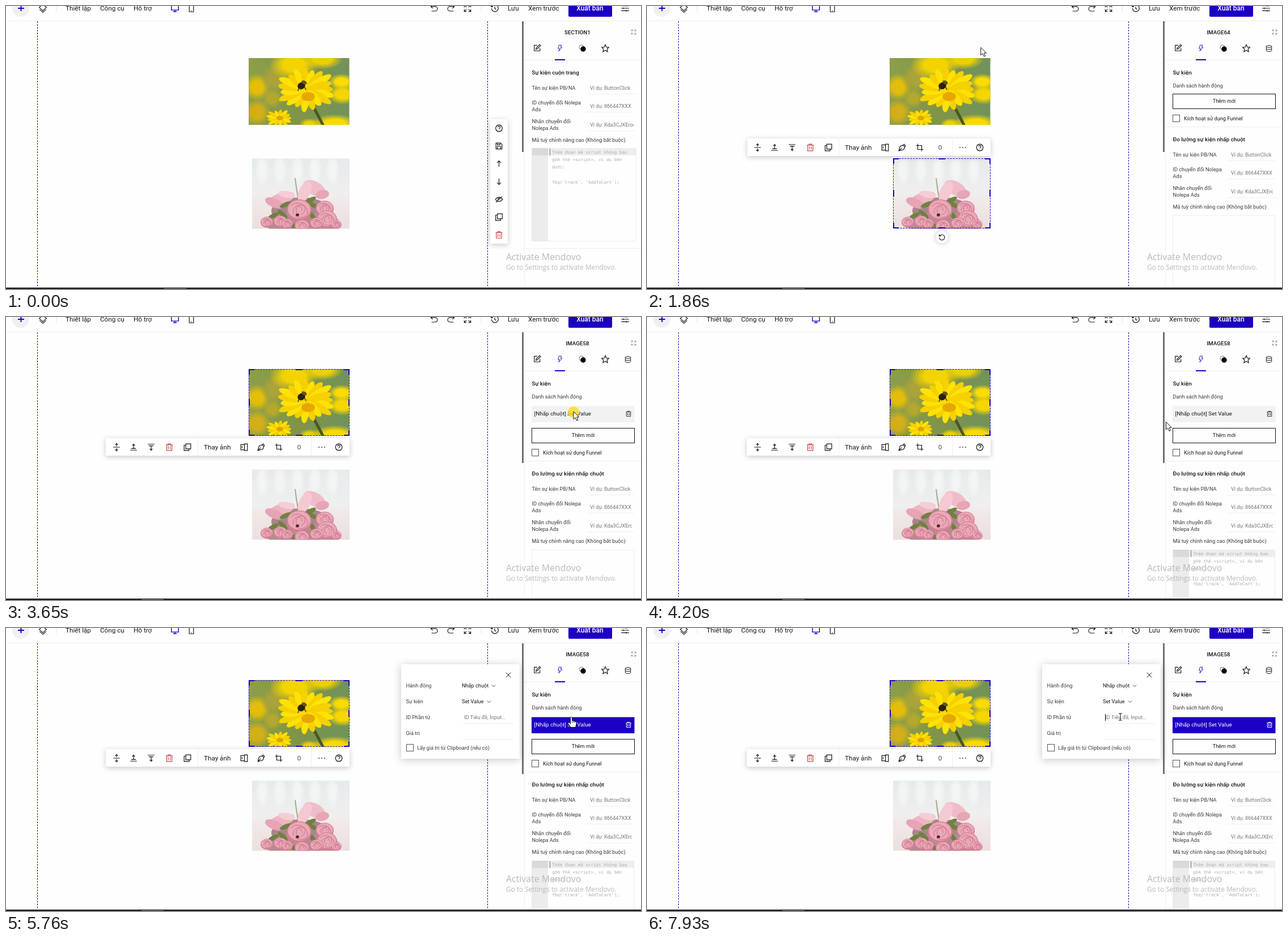
An HTML page with a canvas for the animation above (8 s loop, 1120x500 px).

```html
<!DOCTYPE html>
<html lang="vi">
<head>
<meta charset="utf-8">
<style>
html, body { margin: 0; width: 1120px; height: 500px; overflow: hidden; background: #fefefe; }
canvas { display: block; }
</style>
</head>
<body>
<canvas id="stage" width="1120" height="500"></canvas>
<script>
const ctx = document.getElementById('stage').getContext('2d');
const BLUE = '#1c00c2', INK = '#17171b', GREY = '#757575', RED = '#c9474c', LOOP = 8000;

const ICONS = {
  layers: 'M12 2L21 10L12 18L3 10Z M4 15L12 22L20 15',
  desktop: 'M2 3H22V17H2Z M12 17V21 M7 21.5H17',
  mobile: 'M6 1H18V22H6Z M11 19H13',
  undo: 'M8 2L3 7L8 12 M3 7H15A6 6 0 0 1 15 20H5',
  redo: 'M16 2L21 7L16 12 M21 7H9A6 6 0 0 0 9 20H19',
  expand: 'M3 9V3H9L3 3L9 9 M15 3H21V9V3L15 9 M21 15V21H15H21L15 15 M9 21H3V15V21L9 15',
  history: 'M3 12A9.5 9.5 0 1 0 6 5L3 8 M2 3V8H7 M12 7V13L16 15',
  sliders: 'M1 5H23 M1 12H23 M1 19H23 M15 3V7 M7 10V14 M15 17V21',
  edit: 'M12 4H3V21H20V13 M8 16L9 12L19 2L22 5L12 15Z',
  bolt: 'M9 2H17L14 9H19L8 22L11 13H6Z',
  star: 'M12 2L15 9L22 9.5L17 14.5L18.5 22L12 18L5.5 22L7 14.5L2 9.5L9 9Z',
  data: 'M3 5A9 3.5 0 0 1 21 5A9 3.5 0 0 1 3 5V19A9 3.5 0 0 0 21 19V5 M3 12A9 3.5 0 0 0 21 12',
  help: 'M12 2A10 10 0 1 0 12.01 2 M8.5 9A3.5 3.5 0 1 1 13 12.5Q12 13 12 14.5 M12 17V18.5',
  save: 'M3 3H17L21 7V21H3Z M7 3V8H15V3 M7 21V13H17V21',
  up: 'M12 21V3 M6 9L12 3L18 9',
  down: 'M12 3V21 M6 15L12 21L18 15',
  hidden: 'M1 12Q12-1 23 12Q12 25 1 12 M9 13A3.5 3.5 0 0 1 14 9 M3 21L21 3',
  copy: 'M7 2H22V17H7Z M7 6H2V22H17V17',
  trash: 'M2 5H22 M8 5V2H16V5 M4 5V22H20V5 M9 9V18 M15 9V18',
  spread: 'M2 12H22 M12 9V1L8 5 M12 1L16 5 M12 15V23L8 19 M12 23L16 19',
  above: 'M2 21H22 M5 16H19 M12 16V3L8 7 M12 3L16 7',
  below: 'M2 3H22 M5 8H19 M12 8V21L8 17 M12 21L16 17',
  flip: 'M12 4H2V20H12 M13 2H22V22H13Z M6 9V15',
  pen: 'M2 22L6 8L15 5L20 10L17 18Z M2 22L11 13 M15 5L18 2L22 7L20 10',
  crop: 'M6 1V18H23 M1 6H18V23',
  dots: 'M3 12H5 M11 12H13 M19 12H21',
  rotate: 'M4 8A9.5 9.5 0 1 1 3 14 M3 2V8H9',
  close: 'M4 4L20 20 M20 4L4 20',
  chevron: 'M3 8L12 17L21 8'
};

function text(s, x, y, size = 9.2, color = '#3a3a40', weight = 400, align = 'left', family = 'Roboto, sans-serif') {
  ctx.font = `${weight} ${size}px ${family}`;
  ctx.fillStyle = color;
  ctx.textAlign = align;
  ctx.fillText(s, x, y + size * .36);
}
function rect(x, y, w, h, color) {
  ctx.fillStyle = color;
  ctx.fillRect(x, y, w, h);
}
function frame(x, y, w, h, color) {
  ctx.strokeStyle = color;
  ctx.lineWidth = 1;
  ctx.strokeRect(x + .5, y + .5, w - 1, h - 1);
}
function card(x, y, w, h, blur = 9) {
  ctx.save();
  ctx.shadowColor = 'rgba(0,0,0,.22)';
  ctx.shadowBlur = blur;
  ctx.shadowOffsetY = 2;
  rect(x, y, w, h, '#fff');
  ctx.restore();
}
function icon(name, x, y, size = 14, color = INK, width = 1.2) {
  const k = size / 24;
  ctx.save();
  ctx.translate(x - size / 2, y - size / 2);
  ctx.scale(k, k);
  ctx.strokeStyle = color;
  ctx.lineWidth = width / k;
  ctx.stroke(new Path2D(ICONS[name]));
  ctx.restore();
}
function oval(x, y, rx, ry, color, angle = 0) {
  ctx.fillStyle = color;
  ctx.beginPath();
  ctx.ellipse(x, y, rx, ry, angle, 0, 7);
  ctx.fill();
}
function glow(x, y, r, color, squash = 1) {
  ctx.save();
  ctx.translate(x, y);
  ctx.scale(1, squash);
  const g = ctx.createRadialGradient(0, 0, r * .45, 0, 0, r);
  g.addColorStop(0, color);
  g.addColorStop(1, color + '00');
  oval(0, 0, r, r, g);
  ctx.restore();
}
function line(color, width, ...points) {
  ctx.strokeStyle = color;
  ctx.lineWidth = width;
  ctx.beginPath();
  for (let i = 0; i < points.length; i += 2) ctx.lineTo(points[i], points[i + 1]);
  ctx.stroke();
}
function clipped(x, y, w, h, draw) {
  ctx.save();
  ctx.beginPath();
  ctx.rect(x, y, w, h);
  ctx.clip();
  draw();
  ctx.restore();
}

function daisy(x, y, r, squash, petals) {
  oval(x, y, r * .5, r * .5 * squash, '#f2cb00');
  for (let i = 0; i < petals; i++) {
    const a = i * 6.283 / petals, reach = r * (.52 + .05 * (i % 3));
    const dx = Math.cos(a) * reach, dy = Math.sin(a) * reach * squash;
    oval(x + dx, y + dy, Math.hypot(dx, dy) * .85, r * .14, i % 2 ? '#ffe205' : '#f6d000', Math.atan2(dy, dx));
  }
}
function flowerPhoto() {
  clipped(428, 92, 177.5, 118, () => {
    const g = ctx.createLinearGradient(428, 0, 605, 0);
    g.addColorStop(0, '#8c9f4a');
    g.addColorStop(.5, '#7f9448');
    g.addColorStop(1, '#71925c');
    rect(428, 92, 178, 118, g);
    glow(443, 143, 24, '#e3bd0a');
    glow(474, 128, 26, '#a9a33a');
    glow(508, 104, 44, '#f4d303', .6);
    glow(558, 94, 36, '#ecd005', .5);
    glow(443, 188, 24, '#d2ae18');
    glow(470, 163, 18, '#b3a82d');
    glow(592, 134, 24, '#fbdb02', .6);
    glow(594, 156, 28, '#f5d602', .65);
    glow(580, 208, 42, '#f8da03', .4);
    glow(535, 209, 18, '#ead007', .6);
    line('#4c5720', 5, 536, 168, 547, 187, 560, 212);
    daisy(530, 147, 48, .74, 19);
    oval(533, 160, 12, 8, '#e5a800');
    daisy(482, 198, 22, .65, 13);
    oval(483, 198, 6, 4, '#dca406');
    oval(521, 141, 7, 6, '#282310', -.5);
    oval(526, 135, 5, 3, '#665418', .5);
    line('#282310', 1.2, 517, 143, 515, 150);
    line('#282310', 1.2, 526, 142, 529, 148);
  });
}
function rose(x, y, r) {
  oval(x, y, r, r * .88, '#d27f94');
  oval(x, y - r * .08, r * .9, r * .74, '#eaa9b8');
  for (let k = .72; k > .2; k -= .2) {
    ctx.strokeStyle = '#cb6f87';
    ctx.lineWidth = 1;
    ctx.beginPath();
    ctx.ellipse(x, y, r * k, r * k * .75, k * 5, 0, 4.8);
    ctx.stroke();
  }
}
function rosePhoto() {
  clipped(434, 269.5, 172, 124, () => {
    const g = ctx.createLinearGradient(0, 269, 0, 393);
    g.addColorStop(0, '#e6eaec');
    g.addColorStop(.5, '#efefef');
    g.addColorStop(.62, '#f1e8e8');
    g.addColorStop(1, '#ebdfdf');
    rect(434, 269, 172, 125, g);
    for (let x = 452; x < 600; x += 31) glow(x, 290, 12, '#f3f5f5', 2.5);
    line('#a3a98c', 2, 510, 304, 512, 320, 516, 345);
    oval(520, 362, 52, 24, '#a9858a');
    oval(523, 384, 66, 20, '#b78b90');
    oval(544, 322, 21, 12, '#f0bcc8', .5);
    oval(527, 328, 10, 20, '#f4c9d2', .45);
    oval(558, 333, 12, 8, '#e7a5b5', -.2);
    oval(486, 340, 24, 10, '#eeb5c2', -.3);
    oval(473, 348, 17, 8, '#e6a4b5', .4);
    oval(495, 333, 15, 6, '#f5cdd5', .2);
    for (const [x, y, a] of [[537, 343, -.5], [540, 351, .5], [493, 351, -.4], [488, 368, .7], [541, 372, 1], [471, 371, -.5], [505, 388, .3]])
      oval(x, y, 11, 4, '#6f8140', a);
    for (const [x, y, r] of [[562, 358, 16], [517, 361, 22], [566, 377, 18], [484, 381, 12], [460, 382, 11], [548, 384, 12], [496, 385, 10], [522, 389, 13], [583, 386, 9]])
      rose(x, y, r);
    oval(514, 369, 3, 2.5, '#4c262d');
  });
}

function outline(x, y, w, h, handles) {
  ctx.setLineDash([3, 2]);
  frame(x, y, w, h, BLUE);
  ctx.setLineDash([]);
  if (!handles) return;
  const r = x + w, b = y + h, mx = x + w / 2, my = y + h / 2;
  for (const [cx, cy, sx, sy] of [[x + 1, y + 1, 1, 1], [r - 1, y + 1, -1, 1], [x + 1, b - 1, 1, -1], [r - 1, b - 1, -1, -1]])
    line(BLUE, 2, cx + 9 * sx, cy, cx, cy, cx, cy + 9 * sy);
  for (const yy of [y + 1, b - 1]) line(BLUE, 2, mx - 6, yy, mx + 6, yy);
  for (const xx of [x + 1, r - 1]) line(BLUE, 2, xx, my - 6, xx, my + 6);
}
function elementBar(x, y) {
  card(x, y, 606 - x, 31);
  const m = y + 16;
  [['spread', 195], ['above', 225], ['below', 256], ['trash', 288], ['copy', 320], ['flip', 420], ['pen', 450], ['crop', 481], ['help', 587]]
    .forEach(([name, ix]) => icon(name, ix, m, 14, name == 'trash' ? RED : INK));
  icon('dots', 557, m, 15, INK, 2);
  text('Thay ảnh', 349, m, 11.7, INK);
  text('0', 517, m, 11.5, '#444', 400, 'center');
  rect(338, y, 1, 31, '#eee');
  rect(538, y, 1, 31, '#eee');
}
function sectionBar() {
  card(854, 200, 31, 220);
  ['help', 'save', 'up', 'down', 'hidden', 'copy', 'trash']
    .forEach((name, i) => icon(name, 869.5, 216 + i * 31.4, 14, name == 'trash' ? RED : INK));
}

function header() {
  rect(0, 26, 1120, 1, '#eeeef0');
  oval(26, 4, 15, 15, '#f0f0f4');
  line(BLUE, 2, 21, 4, 32, 4);
  line(BLUE, 2, 26.5, -1, 26.5, 9);
  icon('layers', 65, 4, 17);
  rect(88, 0, 1, 10, '#e4e4e6');
  rect(838, 0, 1, 10, '#e4e4e6');
  [['Thiết lập', 105], ['Công cụ', 166], ['Hỗ trợ', 225], ['Lưu', 885], ['Xem trước', 921]]
    .forEach(([s, x]) => text(s, x, 4, 11.7, INK));
  icon('desktop', 298, 4, 15, BLUE, 1.4);
  [['mobile', 327], ['undo', 755], ['redo', 785], ['expand', 814], ['history', 862], ['sliders', 1092]]
    .forEach(([name, x]) => icon(name, x, 4, 15));
  ctx.fillStyle = BLUE;
  ctx.beginPath();
  ctx.roundRect(992, -10, 77, 29, 2);
  ctx.fill();
  text('Xuất bản', 1030, 4, 12, '#fff', 500, 'center');
}
function editor(y, right, bottom, loaded) {
  clipped(927, y, right - 926, bottom - y, () => {
    frame(927, y, right - 927, 165, '#ececec');
    if (!loaded) return;
    rect(928, y, 28, 164, '#ebecec');
    rect(928, y, 28, 13, '#dadada');
    rect(956, y, right - 957, 13, '#eeeeee');
    rect(959, y + 1, 1, 12, '#777');
    ['Thêm đoạn mã script không bao', 'gồm thẻ <script>, ví dụ bên', 'dưới:', '', "fbq('track', 'AddToCart');"]
      .forEach((s, i) => text(s, 963, y + 7 + i * 13.2, 7.6, '#adadad', 400, 'left', '"DejaVu Sans Mono", monospace'));
  });
}
function trackingFields(y, right) {
  text('Tên sự kiện PB/NA', 927.5, y);
  text('ID chuyển đổi Nolepa', 927.5, y + 26);
  text('Ads', 927.5, y + 37.5);
  text('Nhãn chuyển đổi', 927.5, y + 59);
  text('Nolepa Ads', 927.5, y + 70.5);
  text('Mã tuỳ chỉnh nâng cao (Không bắt buộc)', 927.5, y + 92);
  [['ButtonClick', 0], ['866447XXX', 31.5], ['Kda3CJXEroeW', 64.5]].forEach(([s, dy]) => {
    clipped(1024, y + dy - 10, right - 1028, 20, () => text('Ví dụ: ' + s, 1030, y + dy, 9.1, GREY));
    rect(1024, Math.round(y + dy + 10), right - 1024, 1, '#f0f0f1');
  });
}
function heading(s, y) { text(s, 927.5, y, 9.95, INK, 500); }
function checkbox(x, y) { frame(x, y, 13, 13, '#555'); }

function imageBody(hasItem, open, loaded) {
  const dy = hasItem ? 41 : 0;
  heading('Sự kiện', 117);
  text('Danh sách hành động', 927.5, 140.5, 9.15);
  if (hasItem) {
    rect(927, 157.5, 181.5, 28.5, open ? BLUE : '#f1f2f3');
    text('[Nhấp chuột] Set Value', 931.5, 170.5, 9.95, open ? '#fff' : INK);
    icon('trash', 1098, 171, 11, open ? '#fff' : '#333', 1);
  }
  frame(927, 155 + dy, 182, 27, '#111');
  text('Thêm mới', 1018, 168 + dy, 9, INK, 400, 'center');
  checkbox(927, 192 + dy);
  text('Kích hoạt sử dụng Funnel', 947, 198.5 + dy, 9.2, INK);
  rect(914, 213 + dy, 206, 1, '#eeeef0');
  heading('Đo lường sự kiện nhấp chuột', 235 + dy);
  trackingFields(263 + dy, 1108);
  editor(370 + dy, 1108, 496, loaded);
}
function panel(t, title) {
  const image = t >= 1720;
  rect(910, 27, 3, 231, '#707070');
  rect(914, 27, 1, 470, '#f0f0f0');
  text(title, 1008, 46, 9.84, INK, 500, 'center');
  icon('expand', 1107, 46, 10, '#999', 1);
  icon('edit', 937, 74);
  icon('bolt', 977, 74.5, 13, BLUE, .9);
  ctx.strokeStyle = '#777';
  ctx.lineWidth = 1;
  ctx.beginPath();
  ctx.arc(1015, 73, 4, 0, 7);
  ctx.stroke();
  oval(1018, 76, 4.7, 4.7, '#000');
  icon('star', 1057, 74.5, 15);
  if (image) icon('data', 1097, 75, 12.5, INK, 1);
  rect(914, 95, 206, 1, '#eeeef0');
  rect(968, 94, 18, 2, BLUE);
  if (image) {
    imageBody(t >= 3640, t >= 5360, t >= 2130 && t < 3640 || t >= 3850);
  } else {
    heading('Sự kiện cuộn trang', 117);
    trackingFields(145, 1111);
    editor(251, 1112, 417, true);
    rect(914, 428, 206, 1, '#eeeef0');
  }
}
function popup(t) {
  card(697, 64, 209, 167, 14);
  icon('close', 886, 83, 13, '#222', 1);
  ['Hành động', 'Sự kiện', 'ID Phần tử', 'Giá trị'].forEach((s, i) => text(s, 705.5, 102 + i * 28));
  text('Nhấp chuột', 804, 102, 9.2, INK);
  icon('chevron', 860, 102, 8, '#444', 1);
  text('Set Value', 804, 130, 9.2, INK);
  icon('chevron', 852, 130, 8, '#444', 1);
  text('ID Tiêu đề, Input...', 808, 158, 9.2, GREY);
  rect(804, 168, 92, 1, '#eee');
  rect(804, 196, 92, 1, '#eee');
  checkbox(706, 205);
  text('Lấy giá trị từ Clipboard (nếu có)', 725, 212);
  if (t >= 7600) rect(808, 152, 1, 12, '#111');
}

// time, x, y
const PATH = [
  [330, 972, 447], [470, 540, 345], [870, 540, 345], [1150, 800, 200], [1430, 1056, 67], [1580, 1056, 67],
  [1720, 830, 46], [1860, 589, 73], [2100, 525, 140], [2330, 516, 150], [2540, 516, 150], [2880, 1055, 67],
  [3000, 1105, 95], [3170, 1045, 140], [3240, 1045, 140], [3450, 1001, 167], [4060, 1001, 167], [4350, 825, 205],
  [4680, 1002, 174], [5560, 1002, 174], [5850, 995, 150], [6190, 979, 171], [6440, 979, 171], [6650, 883, 147],
  [6900, 803, 157], [7200, 835, 157], [8000, 835, 157]
];
const CLICKS = [[730, 870], [2400, 2500], [3590, 3710], [4700, 4880], [7530, 7800]];
const HANDS = [[1350, 1600], [2820, 2960], [3380, 3640], [3720, 4130], [4590, 6480]];
const ARROW = new Path2D('M0 0V13.5L3.2 10.7L5.7 16L8 15L5.6 9.8H9.7Z');
const HAND = new Path2D('M-1.5 1Q0-1 1.5 1V6L8 8Q9.5 9 9 12L7.5 18H-1L-6 11Q-6 8.5-3.5 10L-1.5 12Z');
const during = (spans, t) => spans.some(([a, b]) => t >= a && t < b);

function pointer(t) {
  if (t < 330) return;
  const i = PATH.findIndex(p => p[0] > t), [t0, x0, y0] = PATH[i - 1], [t1, x1, y1] = PATH[i];
  const k = (t - t0) / (t1 - t0), x = x0 + (x1 - x0) * k, y = y0 + (y1 - y0) * k;
  if (during(CLICKS, t)) oval(x, y + 1, 10, 10, 'rgba(250,222,20,.8)');
  ctx.save();
  ctx.translate(x, y);
  if (t >= 6780) {
    line('#111', 1, -3, -6, 3, -6);
    line('#111', 1, 0, -6, 0, 6);
    line('#111', 1, -3, 6, 3, 6);
  } else {
    const hand = during(HANDS, t), shape = hand ? HAND : ARROW;
    ctx.fillStyle = '#fff';
    ctx.strokeStyle = '#111';
    ctx.lineWidth = 1;
    ctx.fill(shape);
    ctx.stroke(shape);
    if (hand) for (const fx of [1.5, 4, 6.5]) line('#111', .8, fx, 6.5, fx, 10);
  }
  ctx.restore();
}

function draw(now) {
  const t = now % LOOP;
  const roseOn = t >= 870 && t < 2470, flowerOn = t >= 2470;
  rect(0, 0, 1120, 500, '#fefefe');
  header();
  ctx.setLineDash([3, 2]);
  line(BLUE, 1, 55.5, 27, 55.5, 497);
  line(BLUE, 1, 849.5, 27, 849.5, 497);
  ctx.setLineDash([]);
  flowerPhoto();
  rosePhoto();
  if (t >= 2070) outline(428, 92, 178, 118, flowerOn);
  if (t >= 450 && t < 2470) outline(434, 269, 172, 124, roseOn);
  if (roseOn) {
    elementBar(177, 234);
    ctx.save();
    ctx.shadowColor = 'rgba(0,0,0,.25)';
    ctx.shadowBlur = 7;
    oval(520, 408.5, 11, 11, '#fff');
    ctx.restore();
    icon('rotate', 520, 408.5, 12);
  } else if (flowerOn) {
    elementBar(176, 214);
  } else {
    sectionBar();
  }
  panel(t, flowerOn ? 'IMAGE58' : roseOn ? 'IMAGE64' : 'SECTION1');
  if (t >= 5360) popup(t);
  rect(0, 497.5, 1120, 3, '#1b1b1d');
  rect(t < 870 ? 279 : 239, 497.5, 39, 3, '#555558');
  const mark = '"Open Sans", sans-serif';
  text('Activate Mendovo', 882, 443, 15.9, '#b9b9b9', 400, 'left', mark);
  text('Go to Settings to activate Mendovo.', 882, 461.5, 11.8, '#b9b9b9', 400, 'left', mark);
  pointer(t);
}

const start = performance.now();
(function tick() {
  draw(performance.now() - start);
  requestAnimationFrame(tick);
})();
</script>
</body>
</html>
```
